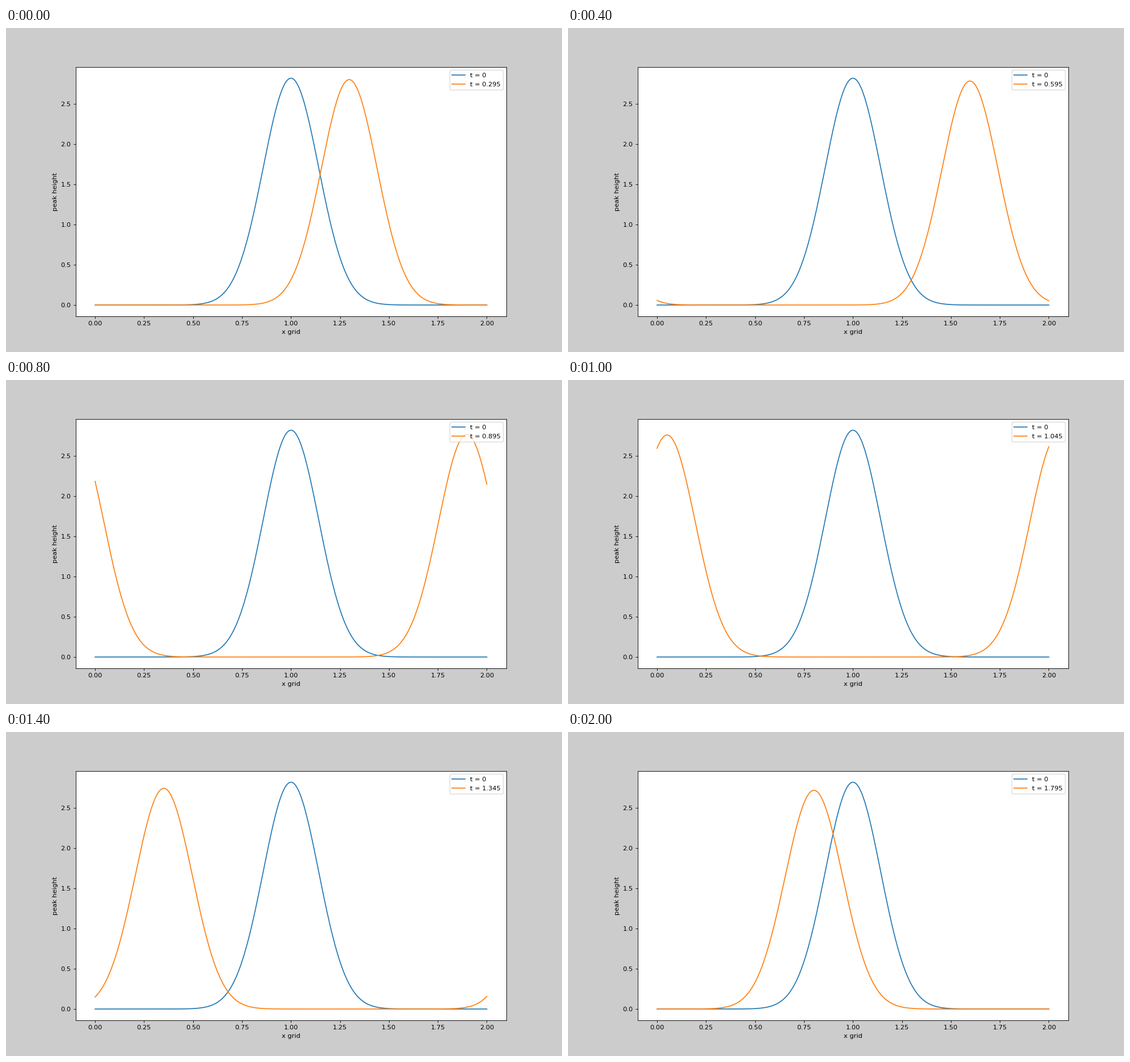
Recreate the animation shown at these times as a matplotlib script. Size 980 px wide and 572 px high, loop 2.2 s.

```python
import numpy as np
import matplotlib.pyplot as plt
from matplotlib.animation import FuncAnimation

FRAMES, INTERVAL = 11, 200
DPI = 980 / 12                   # a 12 inch wide figure, 980 pixels across
DX, DT = 1 / 300, 0.0025
VARIANCE = 0.02
PERIOD = 2 - DX                  # the wrap drops one grid cell
SPREAD = DX * (1 - DT / DX)      # numerical diffusion of upwind advection

x = np.linspace(0, 2, 601)


def gauss(center, var):
    return np.exp(-(x - center) ** 2 / (2 * var)) / np.sqrt(2 * np.pi * var)


def wave(t):
    """Pulse advected at unit speed around the periodic grid."""
    elapsed = t + DT
    var = VARIANCE + SPREAD * elapsed
    return sum(gauss(1 + elapsed - k * PERIOD, var) for k in range(3))


def label_time(i):
    return 0.295 + 0.15 * i


fig, ax = plt.subplots(figsize=(12, 572 / DPI), dpi=DPI, facecolor="#cccccc")
fig.subplots_adjust(left=0.125, right=0.9, bottom=0.11, top=0.88)

ax.plot(x, gauss(1, VARIANCE), color="#1f77b4", label="t = 0")
moving, = ax.plot(x, wave(label_time(0)), color="#ff7f0e",
                  label=f"t = {label_time(0):.3f}")
ax.set_xlabel("x grid")
ax.set_ylabel("peak height")
time_text = ax.legend(loc="upper right").get_texts()[1]


def update(i):
    t = label_time(i)
    moving.set_ydata(wave(t))
    time_text.set_text(f"t = {t:.3f}")
    return moving, time_text


anim = FuncAnimation(fig, update, frames=FRAMES, interval=INTERVAL,
                     init_func=lambda: update(0), repeat=True, repeat_delay=0)
plt.show()
```
